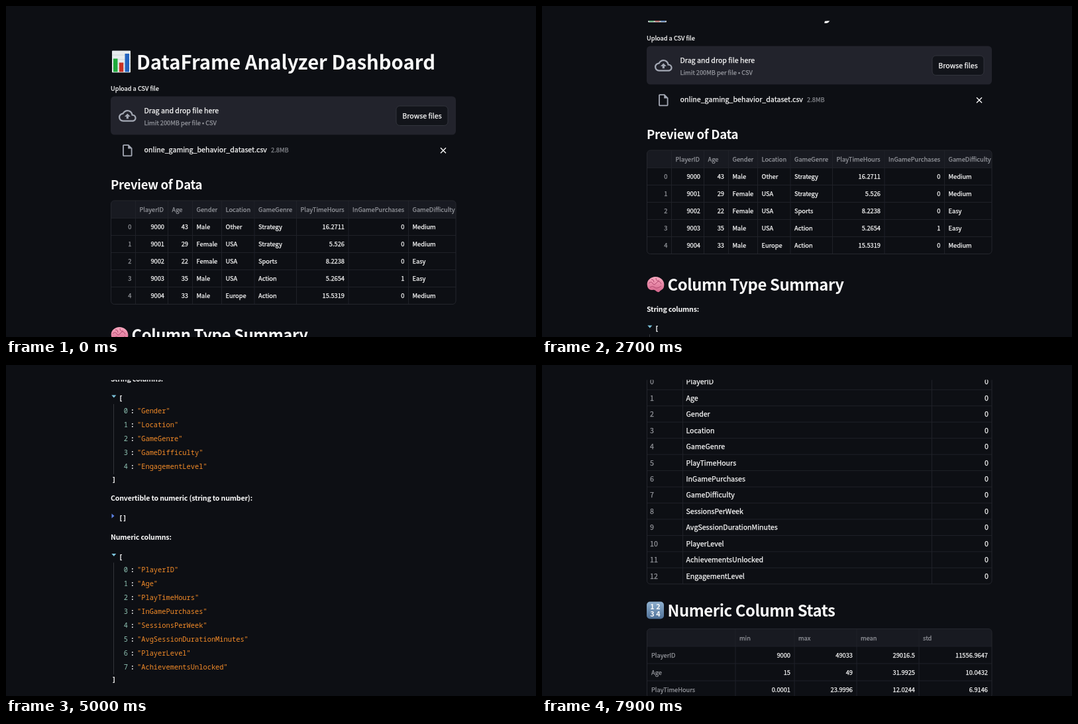
Animation of 800 by 500 pixels, one loop 8 s. Source, as an HTML page:

```html
<!DOCTYPE html>
<html lang="en">
<head>
<meta charset="utf-8">
<title>DataFrame Analyzer Dashboard</title>
<style>
  html, body { margin: 0; width: 100%; height: 100%; overflow: hidden; background: #0d0f14; }
  svg { display: block; width: 800px; height: 500px; }
  text { white-space: pre; }
</style>
</head>
<body>
<svg id="stage" viewBox="0 0 800 500">
  <defs>
    <clipPath id="view"><rect y="22.5" width="800" height="477.5"/></clipPath>
    <linearGradient id="key" x2="0" y2="1">
      <stop offset="0" stop-color="#8fb0cf"/><stop offset="1" stop-color="#4f7198"/>
    </linearGradient>
    <linearGradient id="pink" x2="0" y2="1">
      <stop offset="0" stop-color="#f9a8bf"/><stop offset="1" stop-color="#d4668c"/>
    </linearGradient>
  </defs>
  <rect width="800" height="500" fill="#0d0f14"/>
  <g clip-path="url(#view)"><g id="page"></g></g>
</svg>
<script>
const NS = "http://www.w3.org/2000/svg";
const page = document.getElementById("page");
const SANS = '"Noto Sans CJK JP", "Noto Sans CJK SC", "Noto Sans", sans-serif';
const MONO = '"Noto Sans Mono", "DejaVu Sans Mono", monospace';
const WHITE = "#fafafa", GREY = "#94969c", LINE = "#1f2128", HEAD = "#181a21";
const BODY = 11.84, SMALL = 10.36, CODE = 10.37, H1 = 32.56, H2 = 26.6, H3 = 20.7;

// Font size factor so both families share one em scale
const pen = document.createElement("canvas").getContext("2d");
function factor(family, sample, ems) {
  pen.font = "100px " + family;
  return ems * 100 / pen.measureText(sample).width;
}
const sansK = factor(SANS, "Drag and drop file here", 9.53);
const monoK = factor(MONO, "0000000000", 6);

function el(tag, attrs, parent = page) {
  const node = document.createElementNS(NS, tag);
  for (const k in attrs) node.setAttribute(k, attrs[k]);
  parent.appendChild(node);
  return node;
}
// Regular text gets a hairline stroke, semibold text is set slightly tighter
function text(str, x, y, size = BODY, { fill = WHITE, weight = 400, anchor = "start", mono = false, parent = page } = {}) {
  el("text", {
    x, y, fill, "font-weight": weight, "text-anchor": anchor,
    "font-family": mono ? MONO : SANS,
    "font-size": (size * (mono ? monoK : sansK)).toFixed(3),
    "letter-spacing": weight === 600 ? (-.016 * size).toFixed(3) : 0,
    stroke: fill, "stroke-width": weight === 400 && !mono ? .25 : 0
  }, parent).textContent = str;
}
const rect = (x, y, width, height, fill, rx = 0, parent = page) =>
  el("rect", { x, y, width, height, fill, rx }, parent);
const path = (d, attrs, parent = page) => el("path", { d, fill: "none", ...attrs }, parent);
const line = (d, stroke = LINE, width = 1, parent = page) =>
  path(d, { stroke, "stroke-width": width }, parent);

let clips = 0;
// Rounded box with column and row rules; returns its clipped group
function grid(top, headH, rowH, rows, cols, headFill) {
  const h = headH + rowH * rows, id = "table" + clips++;
  rect(158.5, top, 520.5, h, "none", 5, el("clipPath", { id }));
  const g = el("g", { "clip-path": `url(#${id})` });
  if (headFill) rect(158, top, 522, headH, headFill, 0, g);
  for (let i = 0; i < rows; i++) line(`M158 ${top + headH + rowH * i}H679`, LINE, 1, g);
  for (const x of cols) line(`M${x} ${top}V${top + h}`, LINE, 1, g);
  rect(158.5, top, 520.5, h, "none", 5).setAttribute("stroke", "#24262d");
  return g;
}
// Each column: [left rule, header, text x, alignment]
function dataTable(top, cols, rows) {
  const g = grid(top, 26.5, 26, rows.length, cols.slice(1).map(c => c[0]), HEAD);
  cols.forEach(([x, name, tx, anchor], c) => {
    text(name, x + 6, top + 17, SMALL, { fill: GREY, parent: g });
    rows.forEach((row, r) => text(row[c], tx, top + 43 + 26 * r, SMALL,
      { anchor, fill: c ? WHITE : GREY, parent: g }));
  });
}

function label(str, y, arrow) {
  if (arrow) line(`M158.5 ${y}h6m-2.7 -2.8l2.8 2.8l-2.8 2.8`, WHITE, 1.1);
  text(str, arrow ? 167.5 : 158, y + 4, BODY, { weight: 600 });
}
function list(y, items) {
  const end = y + 38.5 + 21 * (items.length - 1);
  const mark = { mono: true, weight: 700 };
  path(`M159.3 ${y - 5}h7l-3.5 4z`, { fill: "#7cc4dc" });
  text("[", 170, y + 3.5, CODE, mark);
  line(`M162.5 ${y + 8.5}V${end - 8}`, "#33353a");
  items.forEach((s, i) => {
    const b = y + 22.5 + 21 * i;
    text(i, 177.7, b, CODE, { mono: true, fill: "#90c4b5" });
    text(":", 187.8, b, CODE, mark);
    text(`"${s}"`, 198, b, CODE, { mono: true, fill: "#f48c28" });
  });
  text("]", 160, end + 3.5, CODE, mark);
}

function chartIcon(x, y) {
  rect(x, y, 28, 33, "#e6ebee", 1);
  for (let i = 1; i < 5; i++) line(`M${x} ${y + i * 6.6}h28`, "#c4cdd3", .7);
  rect(x + 2, y + 12, 6.5, 20, "#1faa3c");
  rect(x + 10.8, y + 18, 6.5, 14, "#c93225");
  rect(x + 19.5, y + 4.5, 6.5, 27.5, "#2464c0");
}
function brainIcon(x, y) {
  path(`M${x + 1} ${y + 14}C${x - 1} ${y + 5} ${x + 7} ${y} ${x + 13} ${y}C${x + 22} ${y} ${x + 28} ${y + 7} ${x + 26} ${y + 15}` +
    `C${x + 25} ${y + 20} ${x + 20} ${y + 20} ${x + 19} ${y + 23}C${x + 14} ${y + 24} ${x + 14} ${y + 19} ${x + 9} ${y + 20}C${x + 4} ${y + 20} ${x + 2} ${y + 18} ${x + 1} ${y + 14}z`,
    { fill: "url(#pink)" });
  line(`M${x + 3} ${y + 10}q4 -4 6 0t6 -1t7 2M${x + 7} ${y + 4}q4 0 4 4M${x + 14} ${y + 2}q0 5 5 4M${x + 5} ${y + 16}q4 -3 7 0t10 -2`, "#b04a70", 1);
}
function keyIcon(x, y) {
  rect(x, y, 26, 26, "url(#key)", 5);
  const o = { weight: 700, anchor: "middle" };
  ["1", "2", "3", "4"].forEach((d, i) =>
    text(d, x + 8.5 + (i % 2) * 9, y + 11.5 + (i > 1) * 11, 12, o));
}
function group(x, y, k) {
  return el("g", { transform: `translate(${x} ${y}) scale(${k})` });
}

// Header and uploader
chartIcon(160, 67.5);
text("DataFrame Analyzer Dashboard", 197, 96, H1, { weight: 700 });
text("Upload a CSV file", 158, 128, SMALL);
rect(158, 136.5, 521, 58, "#22232c", 5.5);
path("M19.35 10.04A7.49 7.49 0 0 0 12 4C9.11 4 6.6 5.64 5.35 8.04A5.994 5.994 0 0 0 0 14c0 3.31 2.69 6 6 6h13c2.76 0 5-2.24 5-5 0-2.64-2.05-4.78-4.65-4.96z" +
  "M19 18H6c-2.21 0-4-1.79-4-4 0-2.05 1.53-3.76 3.56-3.97l1.07-.11.5-.95C8.08 7.14 9.94 6 12 6c2.62 0 4.88 1.86 5.39 4.43l.3 1.5 1.53.11C20.78 12.14 22 13.45 22 15c0 1.65-1.35 3-3 3z" +
  "M8 13h2.55v3h2.9v-3H16l-4-4z",
  { fill: "#a3a8b4", "fill-rule": "evenodd" }, group(170, 152.5, 1.11));
text("Drag and drop file here", 208.5, 161.5);
text("Limit 200MB per file • CSV", 208.5, 180, SMALL, { fill: "#95979e" });
rect(589, 151, 78, 29.5, "#12141a", 5.5).setAttribute("stroke", "#32343c");
text("Browse files", 628, 169.5, BODY, { anchor: "middle" });
path("M14 2H6c-1.1 0-2 .9-2 2v16c0 1.1.9 2 2 2h12c1.1 0 2-.9 2-2V8l-6-6zM6 20V4h7v5h5v11H6z",
  { fill: "#a3a8b4", "fill-rule": "evenodd" }, group(172.5, 207.5, .9));
text("online_gaming_behavior_dataset.csv", 208.5, 221);
text("2.8MB", 400, 221, SMALL, { fill: "#85878d" });
line("M656 214.2l8 8m0 -8l-8 8", WHITE, 1.4);

// Preview
text("Preview of Data", 158, 277, H3, { weight: 600 });
dataTable(294, [
  [158, "", 189.5, "end"], [195.5, "PlayerID", 239, "end"], [244.5, "Age", 275, "end"],
  [281.5, "Gender", 287.5, "start"], [325.5, "Location", 331.5, "start"],
  [375, "GameGenre", 381, "start"], [438.5, "PlayTimeHours", 511, "end"],
  [517, "InGamePurchases", 601.5, "end"], [607.5, "GameDifficulty", 613.5, "start"]
], [
  "0 9000 43 Male Other Strategy 16.2711 0 Medium",
  "1 9001 29 Female USA Strategy 5.526 0 Medium",
  "2 9002 22 Female USA Sports 8.2238 0 Easy",
  "3 9003 35 Male USA Action 5.2654 1 Easy",
  "4 9004 33 Male Europe Action 15.5319 0 Medium"
].map(r => r.split(" ")));

// Column types
const names = ("PlayerID Age Gender Location GameGenre PlayTimeHours InGamePurchases GameDifficulty " +
  "SessionsPerWeek AvgSessionDurationMinutes PlayerLevel AchievementsUnlocked EngagementLevel").split(" ");
const strings = [2, 3, 4, 7, 12].map(i => names[i]);
const numeric = names.filter(n => !strings.includes(n));
brainIcon(158, 485);
text("Column Type Summary", 189.5, 505.5, H2, { weight: 600 });
label("String columns:", 534);
list(563.5, strings);
label("Convertible to numeric (string to number):", 714);
path("M159.5 737.5v7l4 -3.5z", { fill: "#5d83e6" });
text("[]", 170, 747.5, CODE, { mono: true, weight: 700 });
label("Numeric columns:", 773);
list(803, numeric);
label("Integer columns:", 1017.5, true);
list(1047.5, numeric.filter(n => n !== "PlayTimeHours"));
label("Float columns:", 1241, true);
list(1271, ["PlayTimeHours"]);

// Missing values
const END = 1400, ROW = 24.46, missTop = END - 11.6;
text("Missing Values", 158, missTop - 18.5, H2, { weight: 600 });
const miss = grid(missTop, ROW, ROW, names.length, [212.5, 588.5]);
names.forEach((n, i) => {
  const y = END + 29.2 + ROW * i;
  text(i, 163, y, BODY, { fill: GREY, parent: miss });
  text(n, 217.5, y, BODY, { parent: miss });
  text("0", 674, y, BODY, { anchor: "end", parent: miss });
});

// Stats
keyIcon(158, END + 357.5);
text("Numeric Column Stats", 189.5, END + 379.5, H2, { weight: 600 });
dataTable(END + 398.5, [
  [158, "", 165, "start"], [292, "min", 375, "end"], [381, "max", 469, "end"],
  [475, "mean", 563, "end"], [569, "std", 673, "end"]
], [
  "PlayerID 9000 49033 29016.5 11556.9647",
  "Age 15 49 31.9925 10.0432",
  "PlayTimeHours 0.0001 23.9996 12.0244 6.9146"
].map(r => r.split(" ")));

// Scroll position over time, monotone cubic between points
const LOOP = 8000, STEP = 100;
const keys = [[0, 0], [1700, 0], [2000, 12], [2700, 76], [3500, 199], [3700, 200], [4000, 241],
  [4600, 455], [5000, 513], [5500, 680], [6100, 822], [6400, 880], [7300, 1240], [7900, END]];
const slope = i => (keys[i + 1][1] - keys[i][1]) / (keys[i + 1][0] - keys[i][0]);
function tangent(i) {
  if (i === 0) return 0;
  if (i === keys.length - 1) return slope(i - 1);
  const a = slope(i - 1), b = slope(i);
  return a * b > 0 ? 2 * a * b / (a + b) : 0;
}
function scrollAt(t) {
  if (t >= 7900) return END;
  const i = keys.findIndex((k, n) => t < keys[n + 1][0]);
  const [t0, a] = keys[i], [t1, b] = keys[i + 1];
  const d = t1 - t0, u = (t - t0) / d, v = 1 - u;
  return v * v * (1 + 2 * u) * a + u * u * (3 - 2 * u) * b +
    d * u * v * (v * tangent(i) - u * tangent(i + 1));
}

let start;
function draw(now) {
  start ??= now;
  const t = Math.floor((now - start) % LOOP / STEP) * STEP;
  page.setAttribute("transform", `translate(0 ${-Math.round(scrollAt(t))})`);
  requestAnimationFrame(draw);
}
requestAnimationFrame(draw);
</script>
</body>
</html>
```
